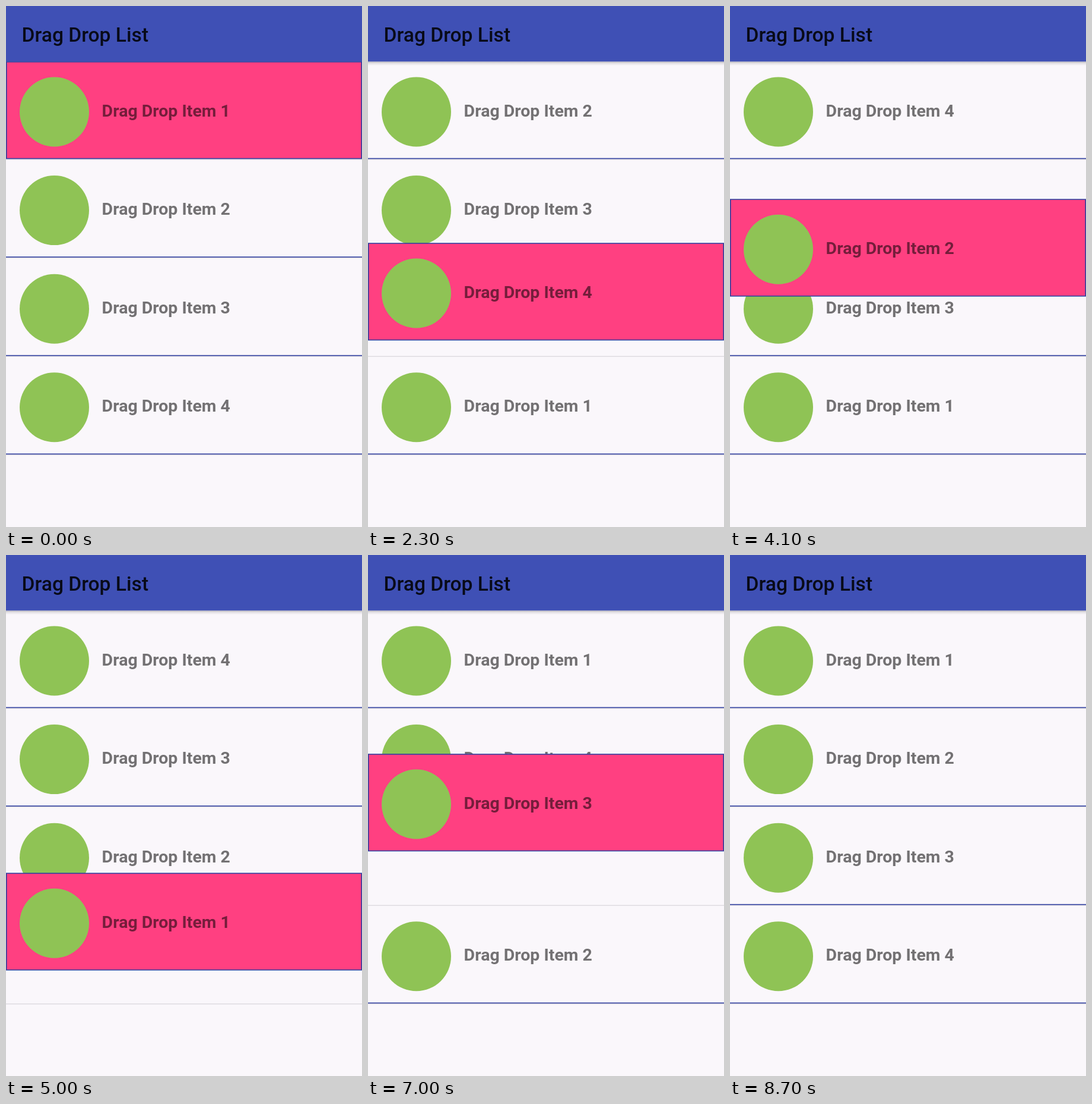
An HTML page with a canvas that plays this animation: 600 px wide and 876 px high, repeating every 8.8 s.

```html
<!DOCTYPE html>
<html lang="en">
<head>
<meta charset="utf-8">
<title>Drag Drop List</title>
<style>
  html, body { margin: 0; width: 100%; height: 100%; overflow: hidden; background: #faf7fb; }
  canvas { display: block; width: 600px; height: 876px; }
</style>
</head>
<body>
<canvas id="stage"></canvas>
<script>
const W = 600, H = 876;
const LOOP = 8800, STEP = 100;
const BAR = 93.4, TOP = 94, PITCH = 165.6, ROW = 163.3, STROKE = 1.6;
const SWAP_DELAY = 75, SWAP_TIME = 50;

const canvas = document.getElementById('stage');
const ctx = canvas.getContext('2d');
const ratio = window.devicePixelRatio || 1;
canvas.width = W * ratio;
canvas.height = H * ratio;
ctx.scale(ratio, ratio);

// A held row eases out from one slot to another; a higher power starts faster.
const drags = [
  { from: 0, to: 2, start: 0, end: 1500, power: 1.5 },
  { from: 3, to: 0, start: 1800, end: 3500, power: 1.4 },
  { from: 1, to: 2, start: 3900, end: 4600, power: 1.5 },
  { from: 3, to: 0, start: 4900, end: 6400, power: 1.72 },
  { from: 2, to: 1, start: 6800, end: 7400, power: 1.94 },
  { from: 3, to: 1, start: 7600, end: 8700, power: 1.5 }
];

const slotY = i => TOP + i * PITCH;
const lerp = (a, b, k) => a + (b - a) * k;
const clamp01 = k => Math.min(1, Math.max(0, k));
const smooth = k => (1 - Math.cos(Math.PI * clamp01(k))) / 2;

// Slot position of the held row at time t, and the time it reaches a given slot position.
function heldSlot({ from, to, start, end, power }, t) {
  const left = (end - t) / (end - start);
  return lerp(to, from, left ** power);
}

function timeAtSlot({ from, to, start, end, power }, slot) {
  const left = (to - slot) / (to - from);
  return lerp(end, start, left ** (1 / power));
}

function activeLayout(order, drag, t) {
  const { from, to } = drag;
  const dir = Math.sign(to - from);
  const rows = [];
  order.forEach((id, i) => {
    if (i === from) return;
    let shift = 0;
    const passed = (i - from) * dir > 0 && (to - i) * dir >= 0;
    if (passed) {
      const swap = timeAtSlot(drag, i - dir / 2) + SWAP_DELAY;
      shift = smooth((t - swap) / SWAP_TIME);
    }
    rows.push({ id, y: slotY(i - dir * shift) });
  });
  return { rows, held: { id: order[from], y: slotY(heldSlot(drag, t)) } };
}

function layout(t) {
  const order = [1, 2, 3, 4];
  for (const drag of drags) {
    if (t < drag.start) break;
    if (t < drag.end) return activeLayout(order, drag, t);
    order.splice(drag.to, 0, order.splice(drag.from, 1)[0]);
  }
  return { rows: order.map((id, i) => ({ id, y: slotY(i) })), held: null };
}

function rect(color, x, y, w, h) {
  ctx.fillStyle = color;
  ctx.fillRect(x, y, w, h);
}

function text(str, x, y, font, color) {
  ctx.font = font + ' Roboto, sans-serif';
  ctx.fillStyle = color;
  ctx.fillText(str, x, y);
}

function drawContent({ id, y }) {
  ctx.fillStyle = '#8fc355';
  ctx.beginPath();
  ctx.arc(81.5, y + 84, 58.5, 0, 2 * Math.PI);
  ctx.fill();
  text('Drag Drop Item ' + id, 161.6, y + 91.6, 'bold 28.5px', 'rgba(0,0,0,0.54)');
}

function drawRow(row) {
  drawContent(row);
  rect('#303f9f', 0, row.y + ROW - STROKE, W, STROKE);
}

function drawHeld(row) {
  const top = row.y - 0.8, height = ROW + 0.8;
  rect('#303f9f', 0, top, W, height);
  rect('#ff4081', STROKE, top + STROKE, W - 2 * STROKE, height - 2 * STROKE);
  drawContent(row);
}

function drawBar() {
  const shade = ctx.createLinearGradient(0, BAR, 0, BAR + 7);
  shade.addColorStop(0, 'rgba(0,0,0,0.26)');
  shade.addColorStop(0.4, 'rgba(0,0,0,0.09)');
  shade.addColorStop(1, 'rgba(0,0,0,0)');
  rect(shade, 0, BAR, W, 7);
  rect('#3f50b5', 0, 0, W, BAR);
  text('Drag Drop List', 26.6, 59.8, '500 33.55px', 'rgba(0,0,0,0.87)');
}

function draw(t) {
  const { rows, held } = layout(t);
  rect('#faf7fb', 0, 0, W, H);
  for (let i = 0; i < 4; i++) rect('#dddadf', 0, slotY(i) + ROW, W, 1.4);
  rows.forEach(drawRow);
  drawBar();
  if (held) drawHeld(held);
}

const begin = performance.now();
function tick() {
  const t = (performance.now() - begin) % LOOP;
  draw(Math.floor(t / STEP) * STEP);
  requestAnimationFrame(tick);
}
tick();
</script>
</body>
</html>
```
